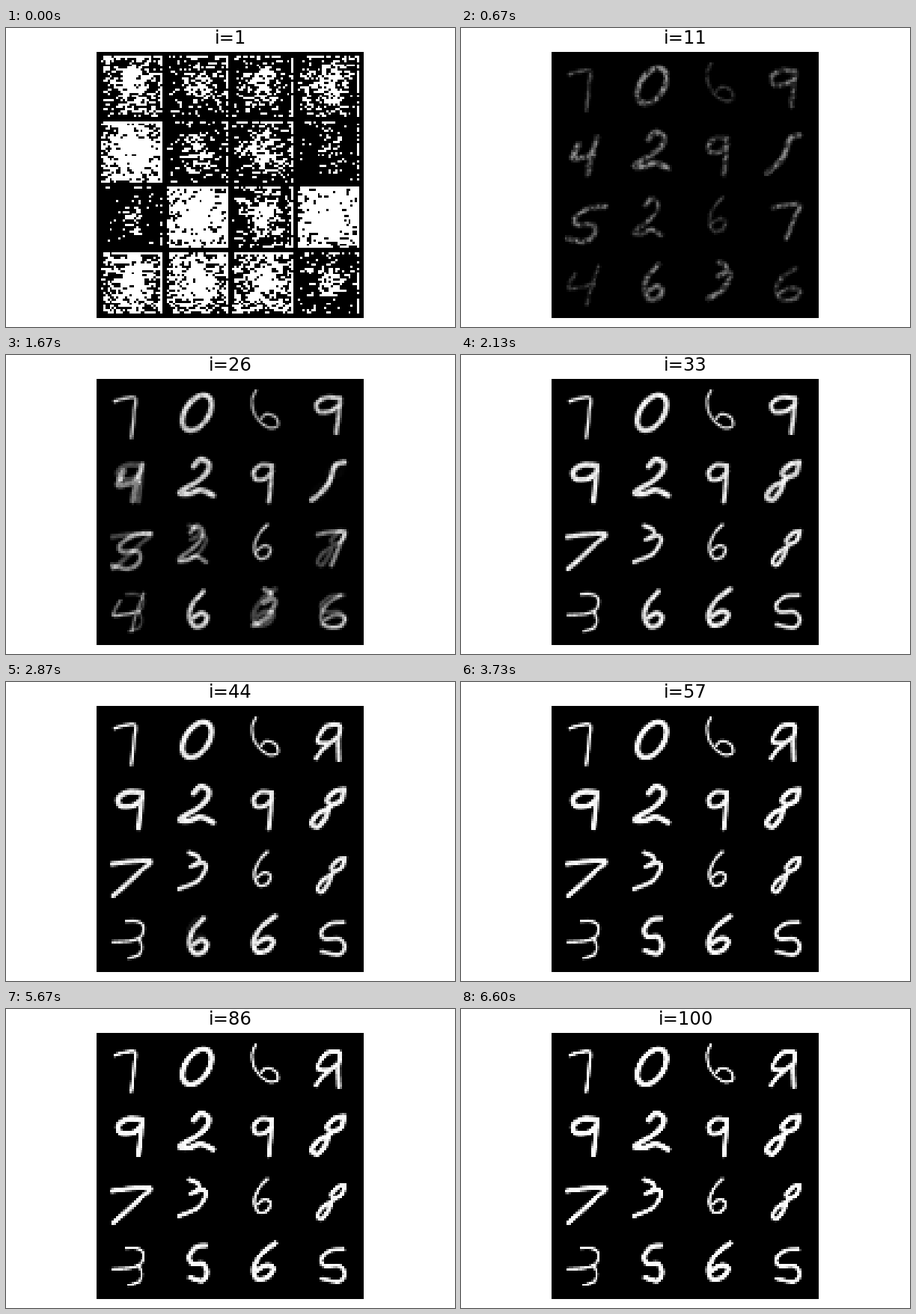
A matplotlib script for the animation above (7670 ms loop, 600x400 px).

```python
import numpy as np
import matplotlib.pyplot as plt
from matplotlib.animation import FuncAnimation

STEPS, FRAMES, INTERVAL = 100, 118, 65
STEP_MS = 200 / 3
SIDE, PAD, GRID = 28, 2, 4
SIZE = GRID * (SIDE + PAD) + PAD
CELL = 356 / SIZE

centres = (np.arange(SIDE) + 0.5) * CELL
X, Y = np.meshgrid(centres, centres)
turn = np.linspace(0, 2 * np.pi, 13)

# Pen strokes of each shape; only the proportions matter.
GLYPHS = {
    "0": [list(zip(np.cos(turn), np.sin(turn)))],
    "1": [[(60, 19), (49, 24), (42, 46), (34, 58), (20, 70)]],
    "2": [[(36, 24), (46, 15), (57, 21), (54, 33), (40, 45), (18, 59), (30, 61), (46, 56), (63, 63)]],
    "3": [[(29, 15), (41, 20), (42, 27), (31, 34), (48, 28), (53, 36), (41, 53), (15, 64)]],
    "3 barred": [[(32, 18), (46, 18), (57, 24), (55, 38), (40, 45), (13, 47)],
                 [(50, 41), (55, 54), (50, 64), (36, 69)]],
    "4": [[(32, 30), (24, 47), (38, 46), (53, 43)], [(59, 22), (50, 45), (45, 66)]],
    "5": [[(59, 20), (42, 22), (31, 34), (36, 43), (54, 43), (61, 54), (53, 64), (32, 60)]],
    "6": [[(50, 11), (36, 26), (29, 46), (36, 62), (50, 60), (55, 48), (46, 43), (34, 50)]],
    "7": [[(19, 24), (32, 20), (46, 20), (45, 38), (43, 58), (41, 74)]],
    "8": [[(60, 19), (48, 22), (38, 33), (42, 42), (24, 54), (17, 66), (26, 70), (36, 58),
           (42, 42), (56, 34), (60, 19)]],
    "9": [[(51, 22), (37, 21), (27, 30), (30, 41), (42, 40), (51, 30)], [(51, 22), (49, 52), (47, 72)]],
    "9 forked": [[(48, 18), (36, 22), (24, 40), (40, 43), (52, 36)],
                 [(42, 43), (32, 52), (22, 64)], [(38, 20), (56, 20), (54, 40), (55, 66)]],
}


def curve(points, n=14):
    """Catmull-Rom samples through the given points."""
    p = np.array([points[0], *points, points[-1]], float)
    t = np.linspace(0, 1, n)[:, None]
    return np.concatenate([
        0.5 * (2 * b + (c - a) * t + (2 * a - 5 * b + 4 * c - d) * t**2
               + (3 * b - a - 3 * c + d) * t**3)
        for a, b, c, d in zip(p, p[1:], p[2:], p[3:])])


def distance(name, box, slant):
    """Distance of each cell from the glyph, sheared and fitted to the box."""
    pts = np.concatenate([curve(s) for s in GLYPHS[name]])
    pts[:, 0] -= slant * pts[:, 1]
    low, high = pts.min(axis=0), pts.max(axis=0)
    start, end = np.array(box[:2]), np.array(box[2:])
    pts = start + (pts - low) / (high - low) * (end - start)
    return np.hypot(X[..., None] - pts[:, 0], Y[..., None] - pts[:, 1]).min(axis=2)


class Panel:
    def __init__(self, bias, early, late, box, radius, slant=0, change=27):
        self.bias, self.radius, self.change = bias, radius, change
        self.early = distance(early, box, slant)
        self.late = distance(late, box, slant)


panels = [
    Panel(-.6, "7", "7", (19, 20, 46, 73), 2.1),
    Panel(-1.2, "0", "0", (21, 17, 60, 64), 3.5, slant=.5),
    Panel(-1.0, "6", "6", (26, 11, 61, 61), 1.7, slant=-.6),
    Panel(-.8, "9", "9 forked", (24, 20, 56, 67), 3, change=38),
    Panel(.3, "4", "9", (23, 22, 55, 70), 3.6),
    Panel(-1.4, "2", "2", (18, 15, 62, 63), 3.6),
    Panel(-.9, "9", "9", (28, 22, 53, 71), 2.9),
    Panel(-1.9, "1", "8", (18, 19, 61, 69), 3.4, change=30),
    Panel(-1.9, "5", "7", (15, 26, 66, 73), 3.1, slant=.42),
    Panel(.7, "2", "3", (17, 16, 53, 64), 2.8),
    Panel(-.9, "6", "6", (29, 15, 51, 60), 2.0),
    Panel(.8, "7", "8", (26, 23, 62, 68), 2.9, slant=.15),
    Panel(-.1, "4", "3 barred", (17, 19, 57, 69), 2.0),
    Panel(0, "6", "5", (30, 16, 54, 63), 3.2, change=47),
    Panel(-.2, "3", "6", (28, 13, 57, 61), 3.3, slant=.2),
    Panel(-1.5, "6", "5", (31, 21, 62, 64), 2.6),
]

bump = np.exp(-((X - 43) / 19) ** 2 - ((Y - 38) / 28) ** 2)
edge = np.zeros((SIDE, SIDE))
edge[0], edge[:, -1], edge[:, 0] = 1.4, 1.8, -.8


def noise(seed, *smooth_axes):
    """Unit normal noise, averaged with its neighbour along the given axes."""
    z = np.random.default_rng(seed).normal(size=(SIDE, SIDE))
    for axis in smooth_axes:
        z = z + 0.6 * np.roll(z, 1, axis=axis)
    return z / z.std()


textures = [np.clip(0.5 + 0.4 * noise(k, 0, 1), 0, 1) for k in range(len(panels))]


def speckle(step, k):
    z = noise(1000 * step + k, 1)
    if step == 1:
        return (z + panels[k].bias + 1.9 * bump + edge > 0).astype(float)
    fade = 0.45 * 0.65 ** (step - 2)
    return fade * np.clip(z + 2.2 * bump - 1.7, 0, 1)


def digit_image(step, k):
    panel = panels[k]
    gain = np.interp(step, [11, 33, 100], [0.7, 1, 1.8])
    # Thin strokes gain their brightness later than thick ones.
    level = np.interp(step, [1, 11, 20, 33, 57], [0, .5, .8, .96, 1]) ** (3 / panel.radius)
    rough = np.interp(step, [11, 20, 33, 57, 100], [.7, .3, .12, .07, .04])

    u = np.clip((step - panel.change + 5) / 10, 0, 1)
    u = u * u * (3 - 2 * u)
    early, late = (np.clip((panel.radius - d) / CELL * gain + 0.5, 0, 1)
                   for d in (panel.early, panel.late))
    return ((1 - u) * early + u * late) * level * (1 - rough * textures[k])


def sheet(step):
    out = np.zeros((SIZE, SIZE))
    for k in range(len(panels)):
        row, col = divmod(k, GRID)
        y, x = PAD + row * (SIDE + PAD), PAD + col * (SIDE + PAD)
        img = digit_image(step, k)
        if step < 9:
            img = np.maximum(img, speckle(step, k))
        out[y:y + SIDE, x:x + SIDE] = img
    return out


fig = plt.figure(figsize=(6, 4), dpi=100, facecolor="white")
ax = fig.add_axes([121.4 / 600, 11.6 / 400, 356.6 / 600, 356.6 / 400])
ax.axis("off")
picture = ax.imshow(sheet(1), cmap="gray", vmin=0, vmax=1, interpolation="nearest", aspect="auto")
title = fig.text(0.5, 379 / 400, "i=1", fontsize=17.5, family="DejaVu Sans",
                 ha="center", va="baseline")


def update(n):
    # Each frame shows the newest step reached before the next tick.
    step = min(STEPS, 1 + int((n * INTERVAL + INTERVAL - 1) / STEP_MS))
    picture.set_data(sheet(step))
    title.set_text(f"i={step}")
    return picture, title


anim = FuncAnimation(fig, update, frames=FRAMES, interval=INTERVAL, repeat=True, repeat_delay=0)
plt.show()
```
